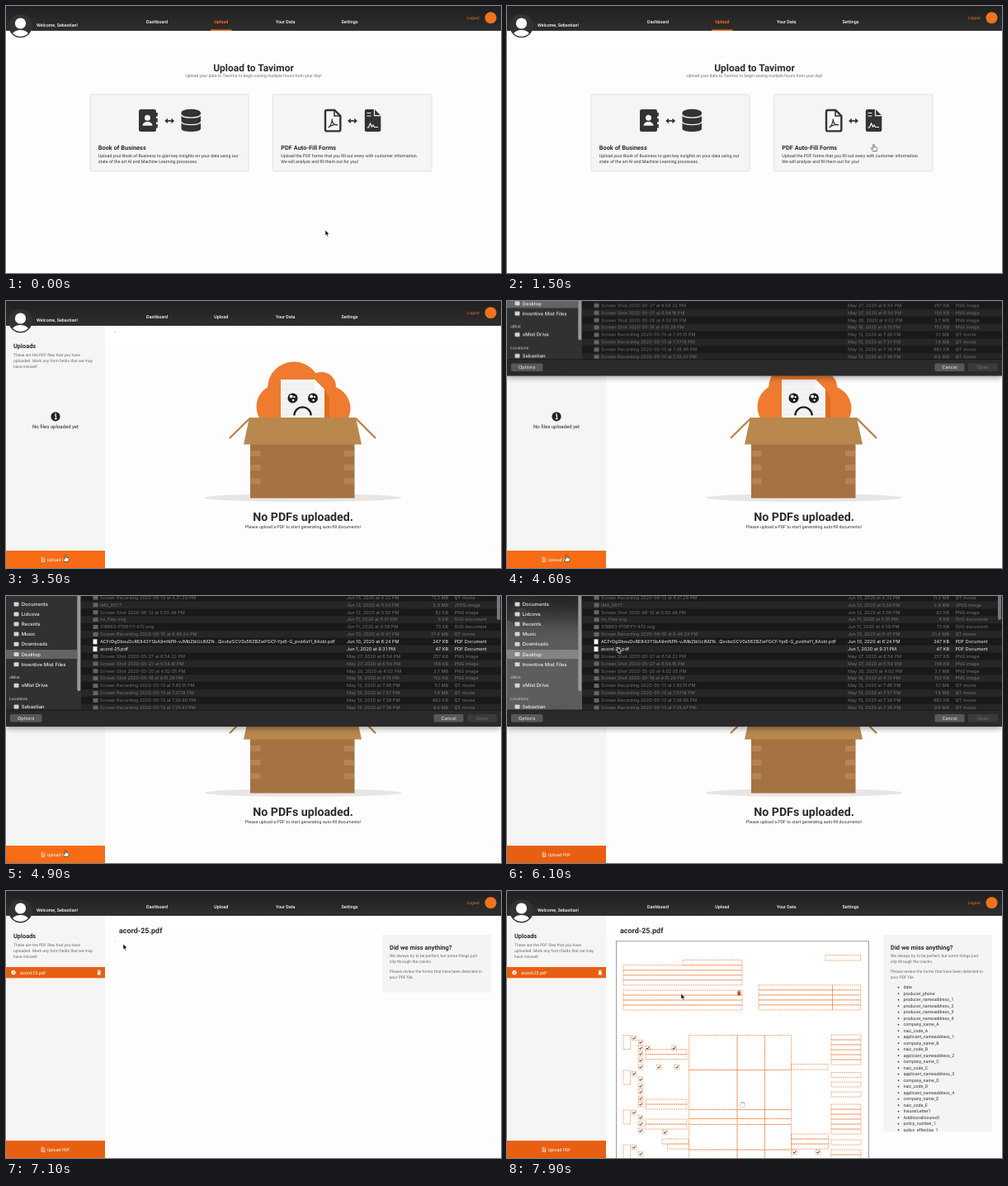
Write an HTML page that moves like this. It is 600 by 323 pixels and loops after 8 s.

```html
<!DOCTYPE html>
<html lang="en">
<head>
<meta charset="utf-8">
<title>PDF upload</title>
<style>
html, body { margin: 0; width: 100%; height: 100%; overflow: hidden; background: #fdfdfd; }
#stage { position: relative; width: 600px; height: 323px; overflow: hidden; background: #fdfdfd; }
svg { position: absolute; left: 0; top: 0; display: block; }
text { font-family: Roboto, sans-serif; text-rendering: geometricPrecision; white-space: pre; }
.h { font-weight: 700; fill: #2b2b2b; }
.body { font-size: 5.27px; fill: #333; }
.note { font-size: 4.95px; fill: #6a6a6a; }
.nav { font-size: 5.4px; font-weight: 500; fill: #fff; }
.mid { text-anchor: middle; }
.end { text-anchor: end; }
.ui text { font-family: Inter, sans-serif; font-size: 5.53px; }
.ui .side { font-size: 5.9px; font-weight: 500; fill: #f0f0f0; }
.ui .head { font-size: 4.7px; font-weight: 600; fill: #b4b4b4; }
.off { fill: #747474; }

/* hard switches */
.show { animation: 8s step-end infinite; }
#home { animation-name: home; }
#files { animation-name: files; }
#empty { animation-name: empty; }
#status { animation-name: status; }
#loaded { animation-name: loaded; }
#sheet { animation-name: sheet; }
#fields, #names { animation-name: fields; }
#trash { animation-name: trash; }
#hover { animation-name: hover; }
#panel { animation-name: panel; }
#asleep { animation-name: asleep; }
#picked { animation-name: picked; }
#ready { animation-name: ready; }
#hand { animation-name: hand; }
#arrow { animation-name: arrow; }
@keyframes home { 0% { opacity: 1 } 25%, 100% { opacity: 0 } }
@keyframes files { 0% { opacity: 0 } 25%, 100% { opacity: 1 } }
@keyframes empty { 0% { opacity: 0 } 25% { opacity: 1 } 87.5%, 100% { opacity: 0 } }
@keyframes status { 0% { opacity: 0 } 21.25% { opacity: 1 } 32.5%, 100% { opacity: 0 } }
@keyframes loaded { 0% { opacity: 0 } 87.5%, 100% { opacity: 1 } }
@keyframes sheet { 0% { opacity: 0 } 91.25%, 100% { opacity: 1 } }
@keyframes fields { 0% { opacity: 0 } 93.75%, 100% { opacity: 1 } }
@keyframes trash { 0% { opacity: 0 } 96.25%, 100% { opacity: 1 } }
@keyframes hover { 0% { opacity: 0 } 41.7% { opacity: 1 } 70%, 100% { opacity: 0 } }
@keyframes panel { 0% { opacity: 1 } 81.25%, 100% { opacity: 0 } }
@keyframes asleep { 0% { opacity: 1 } 65%, 100% { opacity: 0 } }
@keyframes picked { 0% { opacity: 0 } 78.75% { opacity: 1 } 81.25%, 100% { opacity: 0 } }
@keyframes ready { 0% { opacity: 0 } 78.75%, 100% { opacity: 1 } }
@keyframes hand { 0% { opacity: 0 } 15.6% { opacity: 1 } 25% { opacity: 0 } 41.7% { opacity: 1 } 65%, 100% { opacity: 0 } }
@keyframes arrow { 0% { opacity: 1 } 15.6% { opacity: 0 } 25% { opacity: 1 } 41.7% { opacity: 0 } 65%, 100% { opacity: 1 } }

/* the frosted layer stays put and is only uncovered, so its blur never samples beyond the page */
@property --dy { syntax: '<length>'; inherits: true; initial-value: -175px; }
#sheetbox { animation: slide 8s linear infinite; }
#frost, #dialog { position: absolute; left: 0; top: 0; width: 600px; height: 158px; }
#frost {
  background: rgba(44,44,44,.62);
  -webkit-backdrop-filter: blur(14px) saturate(1.5);
  backdrop-filter: blur(14px) saturate(1.5);
  clip-path: inset(0 0 calc(0px - var(--dy)) 0);
}
#dialog { box-shadow: 0 2px 7px rgba(0,0,0,.4); transform: translateY(var(--dy)); }
@keyframes slide {
  0%, 54.5% { --dy: -175px; }
  57.5% { --dy: -68px; }
  59% { --dy: -16px; }
  60.6%, 81.25% { --dy: 0px; }
  82.5% { --dy: -21.5px; }
  84.5%, 100% { --dy: -175px; }
}
#cursor { animation: move 8s ease-in-out infinite; }
@keyframes move {
  0%, 9.5% { transform: translate(387px,271px); }
  19.5%, 32% { transform: translate(445px,166px); }
  42.5%, 69% { transform: translate(72px,307px); }
  76%, 87.5% { transform: translate(134px,62px); }
  88.7%, 90% { transform: translate(142px,64px); }
  96.5%, 100% { transform: translate(211px,124px); }
}
#spin { transform-origin: 285.5px 259px; animation: spin 1s linear infinite; }
@keyframes spin { to { transform: rotate(360deg); } }
</style>
</head>
<body>
<div id="stage">
<svg width="600" height="323" viewBox="0 0 600 323">
  <defs>
    <linearGradient id="bar" x2="0" y2="1"><stop stop-color="#202020"/><stop offset="1" stop-color="#2e2e2e"/></linearGradient>
    <clipPath id="face"><circle cx="17.5" cy="24.2" r="12.8"/></clipPath>
    <clipPath id="box"><rect x="456" y="53" width="132" height="238"/></clipPath>
    <g id="swap" stroke="#333" stroke-width="1.7" fill="#333">
      <path d="M3 0H9"/><path stroke="none" d="M0 0L3.8-3.2V3.2ZM12 0L8.2-3.2V3.2Z"/>
    </g>
    <path id="doc" d="M0 2a2 2 0 0 1 2-2H12L19.5 7.5V25a2 2 0 0 1-2 2H2a2 2 0 0 1-2-2Z"/>
    <path id="bin" d="M0 .8H1.4L1.8 0H3L3.4.8H4.8V1.5H0ZM.4 2H4.4L4.1 6H.7Z"/>
    <path id="tick" d="M-1.5 0L-.4 1.3L1.7-1.4" fill="none"/>
  </defs>

  <rect width="600" height="323" fill="#fdfdfd"/>
  <rect y="30" width="600" height="23" fill="#fff"/>

  <g id="files" class="show">
    <rect y="30" width="120" height="293" fill="#f5f5f5"/>
    <text class="h" font-size="7.4" x="9" y="57.3">Uploads</text>
    <text class="note" x="9" y="66.6">These are the PDF files that you have</text>
    <text class="note" x="9" y="73.7">uploaded. Mark any form fields that we may</text>
    <text class="note" x="9" y="80.8">have missed!</text>
    <rect y="302" width="120" height="21" fill="#e95f12"/>
    <rect id="hover" class="show" y="302" width="120" height="21" fill="#f76b15"/>
    <path d="M43.2 310.2h2.2l1.4 1.4v3.8h-3.6ZM44.2 312.6h1.6M44.2 314h1.6" fill="none" stroke="#fff" stroke-width=".7"/>
    <text x="49.8" y="314.7" font-size="5.25" fill="#fff">Upload PDF</text>
  </g>

  <g id="empty" class="show">
    <circle cx="60" cy="139.8" r="5.6" fill="#222"/>
    <path d="M59 138.8h1.5v3.6M58.7 142.6h2.8" stroke="#fff" stroke-width="1.1" fill="none"/>
    <circle cx="60" cy="136.8" r=".9" fill="#fff"/>
    <text class="mid" x="60" y="154.2" font-size="6" fill="#222">No files uploaded yet</text>
    <rect x="131.5" y="37.5" width="1" height="1" fill="#999"/>
    <ellipse cx="360" cy="238" rx="119.5" ry="4.8" fill="#e9e5e5"/>
    <g fill="#ee7b30">
      <circle cx="349" cy="105.5" r="32"/><circle cx="331" cy="128" r="27.5"/>
      <circle cx="382.5" cy="103.5" r="17.5"/><circle cx="390" cy="130" r="27.5"/>
      <path d="M307 125H414V142H307Z"/>
    </g>
    <path d="M386 107L392 118V142H386Z" fill="#e06c1f"/>
    <path d="M333 95H374L386 107V142H333Z" fill="#f3f3f3"/>
    <path d="M336 101H372M336 107H383M336 113H383M336 119H383M336 125H383M336 131H383M336 137H383" stroke="#e3e3e3" stroke-width=".6"/>
    <path d="M374 95L386 107H374Z" fill="#fff"/>
    <g id="eyes"></g>
    <path d="M349.3 138.3C350.5 125 368.5 125 369.8 138.3" fill="none" stroke="#1c1c1c" stroke-width="2.3"/>
    <path d="M295.5 142L271 166M424 142L448 166" stroke="#b8854b" stroke-width="2.4"/>
    <rect x="296" y="172" width="126.5" height="66.5" fill="#a47243"/>
    <path d="M295 141H424L431 173.5H288Z" fill="#b8884f"/>
    <g id="tape" fill="#b78350"></g>
    <text class="h mid" x="360" y="266" font-size="14.2">No PDFs uploaded.</text>
    <text class="body mid" x="360" y="275.3">Please upload a PDF to start generating auto-fill documents!</text>
  </g>

  <g id="loaded" class="show">
    <rect y="92" width="120" height="13.3" fill="#e95f12"/>
    <circle cx="9" cy="98.6" r="2.7" fill="#fff"/>
    <use href="#tick" transform="translate(9 98.6) scale(.85)" stroke="#e95f12" stroke-width=".9"/>
    <text x="17" y="100.5" font-size="5.45" fill="#fff">acord-25.pdf</text>
    <use href="#bin" x="110.4" y="95.6" fill="#fff"/>
    <text class="h" x="137" y="50.5" font-size="8.95">acord-25.pdf</text>
    <rect x="131.5" y="60.5" width="1" height="1" fill="#aaa"/>
    <rect x="456" y="53" width="132" height="70" fill="#f4f4f4"/>
    <g id="names" class="show" clip-path="url(#box)"><rect x="456" y="53" width="132" height="238" fill="#f4f4f4"/></g>
    <text class="h" x="465" y="70.5" font-size="7.5">Did we miss anything?</text>
    <text class="note" x="465" y="79.8">We always try to be perfect, but some things just</text>
    <text class="note" x="465" y="86.9">slip through the cracks.</text>
    <text class="note" x="465" y="99">Please review the forms that have been detected in</text>
    <text class="note" x="465" y="106.1">your PDF file.</text>
    <g id="sheet" class="show">
      <rect x="132.5" y="60.8" width="306" height="280" fill="#fff" stroke="#858585" stroke-width=".8"/>
      <g id="fields" class="show"></g>
      <use id="trash" class="show" href="#bin" x="278.8" y="120.3" fill="#b04a1e"/>
      <circle cx="285.5" cy="259" r="3.2" fill="#fff" stroke="#ccc" stroke-width=".8"/>
      <path id="spin" d="M285.5 255.8a3.2 3.2 0 0 1 3.2 3.2" fill="none" stroke="#888" stroke-width=".9"/>
    </g>
  </g>

  <rect width="600" height="30" fill="url(#bar)"/>
  <text class="nav mid" x="183" y="21">Dashboard</text>
  <text class="nav mid" x="260.8" y="21">Upload</text>
  <text class="nav mid" x="338.7" y="21">Your Data</text>
  <text class="nav mid" x="416.5" y="21">Settings</text>
  <text x="558.5" y="16.2" font-size="4.9" fill="#f0731f">Logout</text>
  <circle cx="587.5" cy="14.2" r="7" fill="#f0731f"/>
  <circle cx="17.5" cy="24.2" r="14.3" fill="#333"/>
  <g clip-path="url(#face)" fill="#fff"><circle cx="17.5" cy="21" r="6.6"/><ellipse cx="17.5" cy="36" rx="10.5" ry="7"/></g>
  <text x="37" y="25" font-size="5.35" font-weight="500" fill="#fff">Welcome, Sebastian!</text>

  <g id="home" class="show">
    <rect y="53" width="600" height="270" fill="#fdfdfd"/>
    <path d="M31.7 30.2H120V53H0V30.2H4.5A14.3 14.3 0 0 0 30.5 30.2Z" fill="#fff"/>
    <rect x="249" y="14" width="24" height="10" fill="#292929"/>
    <text class="mid" x="260.8" y="21" font-size="5.4" font-weight="700" fill="#f76b15">Upload</text>
    <rect x="248" y="28.5" width="25.5" height="1.5" fill="#f76b15"/>
    <text class="h mid" x="300" y="79.3" font-size="12">Upload to Tavimor</text>
    <text class="note mid" x="300" y="86.4" style="font-size:5.05px">Upload your data to Tavimor to begin saving multiple hours from your day!</text>
    <g fill="#f5f5f5" stroke="#dcdcdc" stroke-width=".8">
      <rect x="102" y="107" width="192" height="92.8" rx="1"/><rect x="323.5" y="107" width="192.5" height="92.8" rx="1"/>
    </g>
    <g fill="#333">
      <rect x="161" y="125" width="21" height="27" rx="2.5"/>
      <path d="M182 129h1.8v4.5H182ZM182 136h1.8v4.5H182ZM182 143h1.8v4.5H182Z"/>
      <path d="M212.5 129V148.5C212.5 153.2 236 153.2 236 148.5V129Z"/>
      <ellipse cx="224.2" cy="129" rx="11.75" ry="4.2"/>
    </g>
    <g fill="#f5f5f5"><circle cx="171.5" cy="135.3" r="3.5"/><path d="M165.5 144.8c0-6.5 12-6.5 12 0Z"/></g>
    <path d="M212.5 131.5c1 4.7 22.5 4.7 23.5 0M212.5 140.2c1 4.7 22.5 4.7 23.5 0" fill="none" stroke="#f5f5f5" stroke-width="1.3"/>
    <use href="#swap" x="192.2" y="139"/><use href="#swap" x="414" y="139"/>
    <use href="#doc" transform="translate(387 126) scale(.94)" fill="none" stroke="#333" stroke-width="2.6"/>
    <path d="M398 126.5V133H404.5" fill="none" stroke="#333" stroke-width="1.6"/>
    <path d="M390.5 147c2.5-1 5-6.5 4.8-10.5c-.8 4.500 3 8 6 7.300c-2-1.200-7 .2-10.800 3.200" fill="none" stroke="#333" stroke-width="1.2"/>
    <use href="#doc" x="434.8" y="125" fill="#333"/>
    <path d="M446.5 125V132.6H454.5M437.5 129.5h5M437.5 133h5M437.5 147h2l2-5l2 4l1.5-2l1.5 2.5h4.5" fill="none" stroke="#f5f5f5" stroke-width="1.2"/>
    <text class="h" x="111.8" y="174" font-size="7.4">Book of Business</text>
    <text class="body" x="111.8" y="182.5">Upload your Book of Business to gain key insights on your data using our</text>
    <text class="body" x="111.8" y="190">state of the art AI and Machine Learning processes.</text>
    <text class="h" x="333.3" y="174" font-size="7.4">PDF Auto-Fill Forms</text>
    <text class="body" x="333.3" y="182.5">Upload the PDF forms that you fill out every with customer information.</text>
    <text class="body" x="333.3" y="190">We will analyze and fill them out for you!</text>
  </g>

  <g id="status" class="show">
    <path d="M0 313.5H198a1.5 1.5 0 0 1 1.5 1.5V323H0Z" fill="#2e3032"/>
    <text x="2" y="320.4" font-size="5.85" fill="#b5b5b5">Waiting for 127.0.0.1...</text>
  </g>
</svg>

<div id="sheetbox">
<div id="frost"></div>
<div id="dialog">
<svg class="ui" width="600" height="158" viewBox="0 0 600 158">
  <g id="panel" class="show">
    <rect width="91" height="138" fill="#222" opacity=".3"/>
    <rect id="asleep" class="show" width="91" height="138" fill="#313131"/>
    <rect y="65" width="86" height="11" fill="#fff" opacity=".25"/>
    <g id="places"></g>
    <rect x="91" width="509" height="138" fill="#191919"/>
    <rect x="86.3" y="-4" width="4" height="119" rx="2" fill="#999"/>
    <g id="rows"></g>
    <rect x="595" y="-4" width="4" height="33" rx="2" fill="#777"/>
  </g>
  <rect y="138" width="600" height="20" fill="#2a2a2a"/>
  <rect y="137.6" width="600" height=".8" fill="#161616"/>
  <g fill="#585858"><rect x="5" y="143" width="38.5" height="9.5" rx="1.5"/><rect x="518.5" y="143" width="36" height="9.5" rx="1.5"/></g>
  <rect x="559" y="143" width="36" height="9.5" rx="1.5" fill="#3a3a3a"/>
  <text class="mid off" x="577" y="149.9">Open</text>
  <g id="ready" class="show">
    <rect x="559" y="143" width="36" height="9.5" rx="1.5" fill="#585858"/>
    <text class="mid" x="577" y="149.9" fill="#eee">Open</text>
  </g>
  <g fill="#eee"><text class="mid" x="24.2" y="149.9">Options</text><text class="mid" x="536.5" y="149.9">Cancel</text></g>
</svg>
</div>
</div>

<svg width="600" height="323" viewBox="0 0 600 323">
  <g id="cursor" stroke="#fff" stroke-width=".6" stroke-linejoin="round">
    <path id="arrow" class="show" d="M0 0V6.8L1.5 5.5L2.6 8L3.8 7.5L2.7 5H4.8Z" fill="#000"/>
    <path id="hand" class="show" d="M-.7.6Q0-.4.7.6V3.3L3.5 3.9Q4.3 4.2 4.2 5.2L3.5 8.5H-.9L-3 5.3Q-2.8 4-1.5 5L-.7 5.7Z" fill="#fff" stroke="#111"/>
  </g>
</svg>
</div>

<script>
const NS = 'http://www.w3.org/2000/svg';
const $ = id => document.getElementById(id);

function add(parent, tag, attrs, label) {
  const el = document.createElementNS(NS, tag);
  for (const k in attrs) el.setAttribute(k, attrs[k]);
  if (label) el.textContent = label;
  return parent.appendChild(el);
}

// illustration details
for (const x of [347.5, 372]) {
  const dot = (dx, dy, r, fill) => add($('eyes'), 'circle', { cx: x + dx, cy: 117.5 + dy, r, fill });
  dot(0, 0, 6, '#1c1c1c');
  dot(-1.8, -2, 1.9, '#fff');
  dot(2, -1.4, 1.2, '#fff');
  dot(.6, 2.5, 1.3, '#fff');
}
for (const y of [181, 198, 214.5])
  for (const x of [296.5, 410]) add($('tape'), 'rect', { x, y, width: 12, height: 7 });

// detected field names
const names = ['date', 'producer_phone'];
for (let i = 1; i < 5; i++) names.push('producer_nameaddress_' + i);
[...'ABCDE'].forEach((c, i) => {
  names.push('company_name_' + c, 'naic_code_' + c);
  if (i < 4) names.push('applicant_nameaddress_' + (i + 1));
});
names.push('InsurerLetter1', 'AdditionalInsured1', 'policy_number_1', 'policy_effective_1');
names.forEach((name, i) => {
  const y = 118.3 + i * 7.5;
  add($('names'), 'circle', { cx: 474.5, cy: y - 1.7, r: .9, fill: '#333' });
  add($('names'), 'text', { x: 480.5, y, 'font-size': 5.3, fill: '#333' }, name);
});

// dashed form fields
function field(x, y, width, height) {
  add($('fields'), 'rect', { x, y, width, height, fill: 'none', stroke: '#ee8040', 'stroke-width': .7, 'stroke-dasharray': '1.7 .9' });
}
function stack(x, y, w, n, h = 6) {
  for (let i = 0; i < n; i++) field(x, y + i * h, w, h);
}
field(213, 83.5, 72, 6);
field(386, 77.5, 42.5, 6.5);
stack(141, 89.8, 144, 4);
stack(141, 120, 144, 4);
stack(305, 113.8, 89.5, 5);
stack(394.5, 113.8, 34, 5);
stack(393, 174, 36, 6);
for (const y of [219.5, 231, 243]) field(393, y, 36, 6);
stack(393, 258, 36, 6);
field(393, 301, 36, 6);
stack(393, 313, 36, 2);
field(344.5, 209.5, 44.5, 6.5);
stack(344.5, 294, 45, 3);
const cols = [220.5, 279, 312.5, 344.5];
const lines = [174.5, 216.5, 264.5, 275.5, 282.5, 313, 330];
for (let c = 0; c < 3; c++)
  for (let r = 0; r < 6; r++)
    field(cols[c], lines[r], cols[c + 1] - cols[c], lines[r + 1] - lines[r]);
stack(168, 191.5, 50, 2);
stack(168, 252, 50, 2);
stack(168, 276, 50, 2);
field(188, 300, 32, 6);
field(194.5, 306, 26, 6);
for (const y of [174.5, 217, 265, 307]) field(141, y, 8.5, 17);

function check(x, y) {
  field(x - 2.8, y - 2.8, 5.6, 5.6);
  add($('fields'), 'use', { href: '#tick', x, y, stroke: '#222', 'stroke-width': 1 });
}
for (const y of [178, 221, 268, 310]) check(154, y);
for (const y of [183, 190, 197, 205, 213, 228, 236, 243, 251, 258, 274, 282, 290, 318]) check(162, y);
for (const [x, y] of [[170.5, 190], [202.5, 190], [184, 213], [206, 213], [191.5, 292], [348.5, 316], [377, 316]]) check(x, y);

// file dialog: places
const places = [['Documents', 10], ['Lidcove', 22], ['Recents', 34], ['Music', 46], ['Downloads', 58.3],
  ['Desktop', 70.6], ['Inventive Mist Files', 82.8], ['oMist Drive', 108.3], ['Sebastian', 134]];
for (const [name, y] of places) {
  add($('places'), 'rect', { x: 9.5, y: y - 2.5, width: 6, height: 5, rx: 1, fill: '#d4d4d4' });
  add($('places'), 'text', { class: 'side', x: 18.7, y: y + 2.1 }, name);
}
add($('places'), 'text', { class: 'head', x: 4, y: 99.6 }, 'oMist');
add($('places'), 'text', { class: 'head', x: 4, y: 125.6 }, 'Locations');

// file dialog: rows of name | date | size | kind
const shot = 'Screen Shot 2020-', rec = 'Screen Recording 2020-';
const files = [
  rec + '06-13 at 4.31.29 PM|Jun 13, 2020 at 4:32 PM|11.3 MB|QT movie',
  'IMG_6677|Jun 12, 2020 at 5:24 PM|2.9 MB|JPEG image',
  shot + '06-12 at 5.00.48 PM|Jun 12, 2020 at 5:00 PM|82 KB|PNG image',
  'no_files.svg|Jun 11, 2020 at 5:01 PM|6 KB|SVG document',
  '318963-P106YY-472.svg|Jun 11, 2020 at 4:58 PM|73 KB|SVG document',
  rec + '06-10 at 6.46.24 PM|Jun 10, 2020 at 6:47 PM|21.4 MB|QT movie',
  'ACFrOgDbouDvRE843YSbA9mNPR-vJMbZblUclMZN...QxvbzSCV0s56ZBZwPGCf-Ypi6-G_pvd4eYl_8Axbl.pdf|Jun 10, 2020 at 6:24 PM|247 KB|PDF Document',
  'acord-25.pdf|Jun 1, 2020 at 9:31 PM|47 KB|PDF Document',
  shot + '05-27 at 6.54.22 PM|May 27, 2020 at 6:54 PM|257 KB|PNG image',
  shot + '05-27 at 6.54.16 PM|May 27, 2020 at 6:54 PM|158 KB|PNG image',
  shot + '05-20 at 4.02.05 PM|May 20, 2020 at 4:02 PM|3.7 MB|PNG image',
  shot + '05-18 at 4.15.29 PM|May 18, 2020 at 4:15 PM|152 KB|PNG image',
  rec + '05-13 at 7.45.15 PM|May 13, 2020 at 7:46 PM|5.1 MB|QT movie',
  rec + '05-13 at 7.37.18 PM|May 13, 2020 at 7:37 PM|1.8 MB|QT movie',
  rec + '05-13 at 7.36.46 PM|May 13, 2020 at 7:36 PM|882 KB|QT movie',
  rec + '05-13 at 7.35.47 PM|May 13, 2020 at 7:36 PM|9.6 MB|QT movie'
];
const pitch = 8.88;
files.forEach((line, i) => {
  const y = 1.9 + i * pitch, pdf = line.endsWith('PDF Document'), rows = $('rows');
  const band = { x: 91, y: y - pitch / 2, width: 509, height: pitch };
  if (i % 2) add(rows, 'rect', { ...band, fill: '#262626' });
  if (line.startsWith('acord')) add(rows, 'rect', { ...band, id: 'picked', class: 'show', fill: '#0a58d0' });
  add(rows, 'rect', { x: 105.5, y: y - (pdf ? 2.9 : 2.4), width: pdf ? 5 : 6, height: pdf ? 6 : 5, fill: pdf ? '#f2f2f2' : '#666' });
  line.split('|').forEach((cell, c) => {
    add(rows, 'text', { x: [114, 413, 536, 543.5][c], y: y + 1.9, fill: pdf ? '#f0f0f0' : '#747474', class: c === 2 ? 'end' : '' }, cell);
  });
});
</script>
</body>
</html>
```
